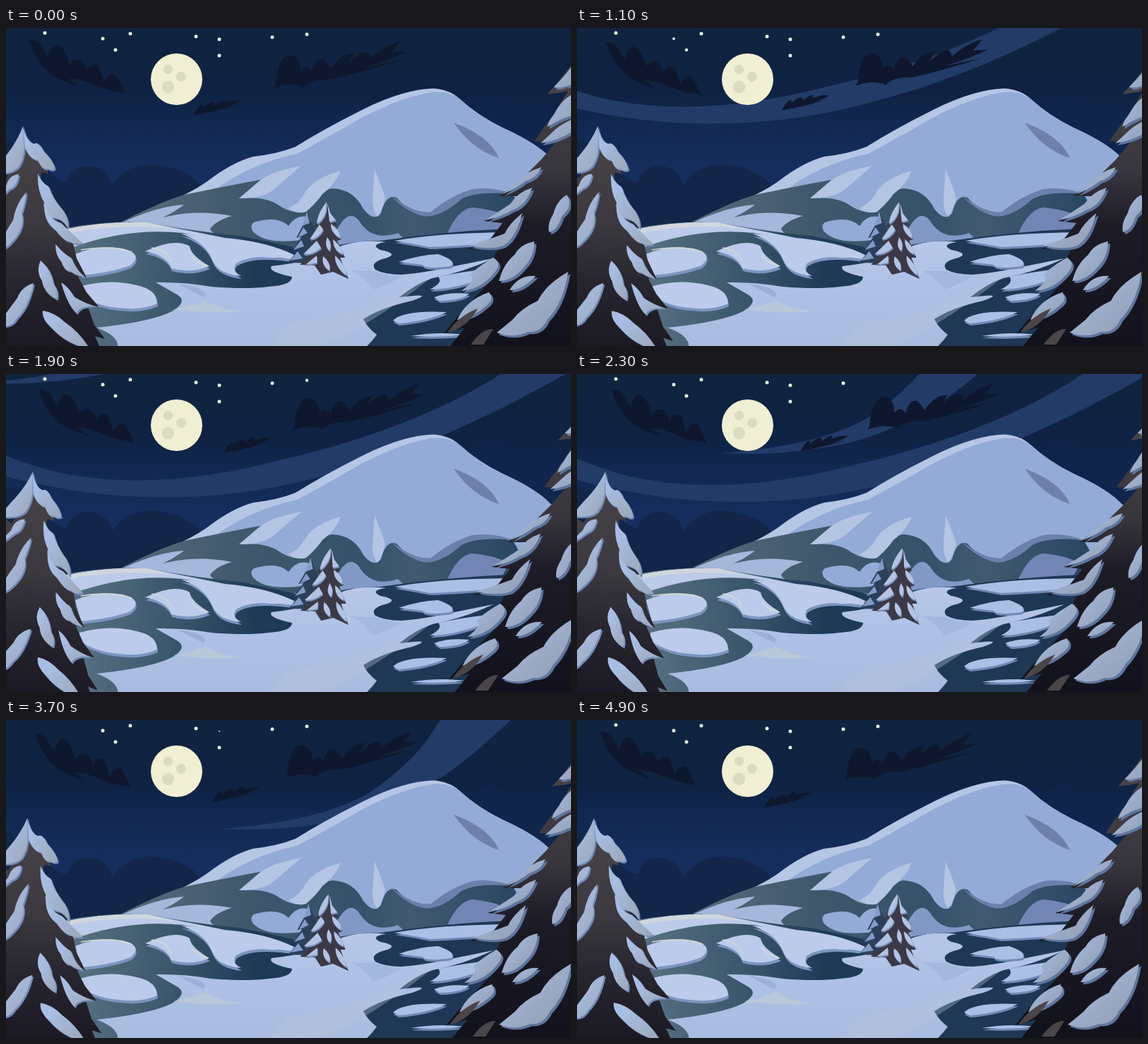
These frames come from a looping animation (800x450 px, 5000 ms). An HTML page:

```html
<!DOCTYPE html>
<html>
<head>
<meta charset="utf-8">
<style>
html, body { margin: 0; height: 100%; overflow: hidden; background: #10223f }
svg { display: block; width: 100%; height: 100% }
</style>
</head>
<body>
<svg id="stage" viewBox="0 0 800 450"></svg>
<script>
const stage = document.getElementById('stage');
const path = (d, fill, extra = '') => `<path d="${d}" fill="${fill}" ${extra}/>`;
const paths = (list, fill) => list.map(d => path(d, fill)).join('');
const disc = (x, y, r, fill) => `<circle cx="${x}" cy="${y}" r="${r}" fill="${fill}"/>`;
const grad = (id, attrs, ...stops) => `<linearGradient id="${id}" ${attrs}>` +
  stops.map(([o, c]) => `<stop offset="${o}" stop-color="${c}"/>`).join('') + '</linearGradient>';
// Snow with a shaded copy peeking out below
const snow = (list, fill, shade, dx, dy) =>
  `<g transform="translate(${dx} ${dy})">${paths(list, shade)}</g>` + paths(list, fill);

const down = 'gradientUnits="userSpaceOnUse" x1="0" y1="0" x2="0" y2="450"';
const across = 'gradientUnits="userSpaceOnUse" x1="0" y1="0" x2="800" y2="0"';
const slant = 'x1="0" y1="0" x2="1" y2="1"';
const defs = '<defs>' +
  grad('sky', down, [0, '#10233f'], [.2, '#0f2243'], [.3, '#112850'], [.42, '#152d5b'], [.62, '#17326a']) +
  grad('rock', across, [.2, '#5a6b7b'], [.42, '#40586d'], [.62, '#34526a'], [.72, '#415a71'], [.9, '#2a4763']) +
  grad('ground', across, [.1, '#5b7384'], [.3, '#3a566c'], [.44, '#1e3a57'], [1, '#1f3653']) +
  grad('field', down, [.62, '#bac9ea'], [.8, '#afc1e6'], [1, '#a9bbdf']) +
  grad('bark', down, [.3, '#4a464b'], [.62, '#3b383f'], [.8, '#27252e'], [1, '#1b1a24']) +
  grad('barkR', down, [.1, '#4a464b'], [.45, '#38353d'], [.62, '#1d1c26'], [1, '#12121c']) +
  grad('frost', slant, [.25, '#a8bde3'], [1, '#9ba7b8']) +
  grad('frostR', slant, [.2, '#a3b6da'], [1, '#909cae']) +
  '</defs>';

// x, y, then the moments (s) when the star vanishes
const stars = [[55, 7, 3.7], [137, 15, .8, 3.05], [155, 31, 1.45], [176, 8], [269, 12, 2.75],
  [302, 16, .55, 3.85], [302, 39, 1.5], [377, 13, 4.4], [426, 9, 2.25]];

const clouds = [
  { dx: 17.5, dy: 6, d: 'M33 17Q42 14 50 26Q54 33 60 42Q64 22 73 24Q83 28 90 52Q95 42 104 45Q112 50 114 60Q122 47 131 54L138 77Q146 62 154 66Q162 78 167 92Q140 88 116 77Q102 71 88 71Q96 78 104 83Q80 76 64 66Q40 46 33 17Z' },
  { dx: 35, dy: -7, d: 'M381 80Q384 40 402 39Q417 42 416 62Q424 50 432 62Q438 41 449 45Q456 52 459 58Q466 46 480 38L492 36Q486 44 484 50Q498 36 508 34Q515 36 514 44Q534 26 557 19Q552 28 544 35L566 34Q540 46 505 57L556 46Q500 64 460 73Q430 72 421 84Q405 76 378 85Z' },
  { dx: 56, dy: -16, d: 'M264 124Q272 107 278 110L277 114Q288 104 293 106L295 110Q304 100 309 103L308 107Q320 101 331 103Q320 110 306 113L325 109Q300 118 264 124Z' }
];

const gusts = [
  'M-200 -20Q-90 90 60 131Q200 163 380 116Q560 75 685 0L835 -100H950Q860 -48 775 0Q600 98 450 136Q230 198 0 140Q-130 100 -200 30Z',
  'M230 123Q370 113 440 72Q490 38 520 0L600 -120H740L606 0Q520 80 410 109Q320 128 230 123Z'
];

const mountain =
  path('M150 280Q250 242 285 217Q320 190 350 182Q385 178 410 168Q450 143 500 118Q560 87 605 85.5Q628 87 642 100Q668 124 703 141Q745 160 765 178L820 230V320H150Z', '#b5c5e4') +
  path('M300 226Q350 191 412 178Q455 155 500 129Q560 97 603 91Q626 88 642 100Q668 124 703 141Q745 160 765 178L820 230V320H340Z', '#93abd6') +
  path('M634 134Q684 152 698 184Q660 172 634 134Z', '#6f81aa') +
  path('M158 277Q230 240 262 234Q320 222 370 213Q356 224 330 241Q368 238 385 250Q405 264 425 260Q440 230 462 227Q492 228 506 256Q521 275 531 262Q538 234 553 240Q576 266 600 262Q625 247 640 236Q670 226 718 236L760 310H158Z', 'url(#rock)') +
  path('M545 237Q580 264 602 260Q628 238 660 228Q690 224 718 235Q668 230 645 242Q614 270 590 266Q566 260 545 237Z', '#6b80ab') +
  paths(['M418 195Q374 203 358 217L330 241Q366 241 381 227Z', 'M474 202Q437 212 424 232Q416 248 400 255Q412 264 425 260Q440 247 448 235Q466 222 474 202Z',
    'M522 200Q531 222 537 240Q533 258 526 267Q518 258 519 240Z'], '#b4c4e3') +
  path('M165 275Q215 252 252 250Q238 261 222 268Q270 256 320 266Q298 272 289 284Q290 291 316 300H160Z', '#a5b8dc') +
  path('M351 275Q385 265 400 280Q412 262 430 268Q440 285 420 300Q365 307 349 287Q345 279 351 275Z', '#93abd6') +
  path('M466 290Q486 250 502 276Q520 302 555 290L575 310H466Z', '#8299c6') +
  path('M624 292Q640 256 660 254Q690 256 712 268L700 292Z', '#7385b5');

const ground =
  path('M80 284Q140 272 200 275Q260 287 330 294Q400 308 440 318Q480 300 530 301Q620 288 710 284L800 270V450H60Z', 'url(#ground)') +
  path('M84 285Q140 273 200 275Q255 286 310 297Q370 302 410 322Q370 330 346 322Q310 302 250 290Q170 282 90 312Z', '#bccbe9') +
  path('M84 285Q140 273 200 275L240 285Q170 275 88 290Z', '#d0d6dc') +
  snow(['M98 320Q130 306 165 312Q196 320 176 336Q150 346 106 350Z',
    'M197 316Q240 296 260 309Q262 322 288 337Q262 348 234 340Q228 322 197 316Z',
    'M104 366Q145 354 185 364Q214 370 214 390Q192 400 160 396Q130 394 104 378Z',
    'M248 291Q310 296 330 312Q366 325 405 320L410 328Q350 318 326 333Q318 343 333 351Q300 348 292 328Q282 302 248 291Z'], '#bccbeb', '#7d94bf', 1, 4) +
  path('M106 314Q150 307 178 317M206 311Q228 314 234 330M262 322Q268 332 286 337', 'none', 'stroke="#d5d9d0" stroke-width="1.6"') +
  path('M212 360Q250 359 290 366Q340 370 372 366Q405 364 405 352Q370 345 376 337Q440 330 470 310Q500 298 538 303Q514 306 530 314Q556 319 540 325Q514 331 523 342Q536 349 560 349Q590 347 640 336L690 326Q650 345 604 354Q580 362 557 381Q610 374 575 386Q530 396 506 412Q512 424 525 434Q518 444 506 455H158Q162 436 128 424Q205 416 235 401Q260 386 240 376Z', 'url(#field)') +
  path('M243 362Q290 368 280 381Q262 372 243 362Z', '#9cafd6') +
  path('M238 398Q270 391 282 385Q300 398 338 401Q290 405 238 398Z', '#b9c7db') +
  path('M523 344Q540 352 560 351Q546 362 520 370Q505 350 488 343Z', '#a4b7dd') +
  path('M400 420Q500 402 560 372L600 355Q520 418 450 450H370Z', '#b8c4db', 'opacity=".35"') +
  snow(['M550 301Q610 290 710 289L738 268L700 304Q630 309 600 310Q580 306 550 301Z', 'M556 331Q585 321 612 320Q640 330 630 337Q592 342 590 335Z',
    'M606 381Q626 373 656 376Q646 385 614 386Z', 'M548 414Q562 399 624 402Q600 414 556 418Z', 'M573 436Q610 429 650 434Q620 438 573 436Z',
    'M612 352Q650 344 690 340L668 357Q630 370 600 370Q620 360 612 352Z'], '#abbfe5', '#7389b5', 1, 3);

const midTrees =
  path('M426 260L440 290 436 333 399 332 412 316 406 314 418 296 411 297 422 276Z', '#2c405c') +
  paths(['M426 260L420 280 430 276Z', 'M421 282L413 297 427 290Z', 'M418 300L407 314 422 309Z', 'M413 316L402 329 420 326Z'], '#849bc7') +
  path('M454 245L459 264 469 279 463 280 475 299 469 301 480 325 473 325 485 355 463 345 446 349 437 336 416 335 432 319 422 320 437 300 428 302 442 281 435 283 447 263Z', '#3c3947') +
  snow(['M454 246Q441 262 440 277Q449 272 453 259Z', 'M455 248L459 262 467 272 458 274Z', 'M444 278L430 299Q442 298 449 285Z', 'M460 277Q459 289 473 297Q473 286 460 277Z',
    'M440 301L421 320Q434 321 446 311Z', 'M455 296Q450 309 458 315Q462 305 455 296Z', 'M463 299Q463 315 477 320Q474 307 463 299Z', 'M440 322L424 335 440 332Z',
    'M449 323Q446 336 458 343Q460 331 449 323Z', 'M466 322Q465 338 482 350Q480 334 466 322Z'], '#b3c3e4', '#7e94c0', 1, 2);

const leftTree =
  path('M24 138L30 164 54 185 60 206 50 204 49 214 64 238 89 283 73 270 80 284 108 305 95 304 100 326 114 353 102 352 114 374 131 394 115 392 125 420 140 440 126 436 150 490H-60V180L0 214 18 172Z', 'url(#bark)') +
  snow(['M24 139Q16 160 2 178Q-20 205 -12 206Q10 206 18 196Q28 180 25 160Z',
    'M24 139Q28 160 40 164Q46 160 53 174Q66 186 69 199Q65 203 58 199Q51 202 45 187Q34 186 27 170Z',
    'M18 207Q4 208 0 224L-22 250Q-2 235 5 228Q16 224 18 207Z', 'M29 232Q14 248 10 272Q-2 290 -14 316Q0 313 8 303Q28 282 22 262Q27 248 29 232Z',
    'M45 206Q49 218 60 224Q66 242 80 257Q90 272 87 283Q80 268 63 268Q51 255 54 247Q44 230 45 206Z',
    'M54 254Q64 272 78 276Q92 290 108 304Q99 308 90 302Q82 302 70 286Q55 276 54 254Z',
    'M70 306Q82 320 92 325Q99 343 112 352Q99 350 91 344Q83 345 78 330Q70 322 70 306Z',
    'M49 329Q42 344 51 358Q54 376 72 384Q75 372 67 362Q64 342 49 329Z', 'M39 361Q22 366 16 382L-12 420Q6 427 16 410Q32 394 39 361Z',
    'M52 400Q50 412 65 425Q84 446 118 454Q104 430 83 416Q68 402 52 400Z', 'M78 360Q88 366 96 380Q112 390 128 394Q104 392 100 404Q87 392 78 360Z'], 'url(#frost)', '#7089b8', 2, 2);

const rightTree =
  path('M810 40L782 76 766 94 796 89 774 124 748 160 778 162 758 186 730 214 698 238 727 238 706 260 677 273 703 276 686 298 653 313 696 313 684 340 664 357 688 356 650 396 620 432 650 424 625 455H880V40Z', 'url(#barkR)') +
  snow(['M810 43Q790 70 776 83Q778 88 812 77Z', 'M810 90Q788 98 776 122Q766 135 767 140Q790 124 810 123Z', 'M810 126Q785 135 772 149L757 163Q784 160 810 141Z',
    'M758 197Q735 204 724 217L703 235Q723 227 735 217Q752 212 758 197Z', 'M745 226Q725 232 714 249L679 272Q702 267 716 258Q736 252 745 226Z',
    'M731 262Q713 276 706 291Q690 297 656 308Q684 314 702 309Q721 301 731 262Z', 'M794 236Q780 244 775 263Q766 277 769 289Q781 286 787 266Q804 252 794 236Z',
    'M748 302Q728 306 720 321Q704 334 698 358Q717 358 733 339Q748 324 748 302Z', 'M690 325Q663 341 657 350Q668 354 645 372Q672 370 690 348Q704 333 690 325Z',
    'M684 374Q651 385 639 413Q663 409 680 393Q692 384 684 374Z', 'M750 351Q726 349 713 371Q730 372 750 351Z',
    'M796 345Q764 363 753 386Q729 397 717 413L695 431Q718 440 739 430Q758 432 767 412Q789 389 796 345Z'], 'url(#frostR)', '#5f769f', 3, 3) +
  paths(['M668 397Q641 407 625 431Q652 425 668 397Z', 'M690 426Q674 425 658 448H676Z', 'M796 84L772 92Q784 93 796 88Z'], '#4a4548');

stage.innerHTML = defs +
  '<rect width="800" height="450" fill="url(#sky)"/>' +
  gusts.map((d, i) => path(d, '#233b67', `id="gust${i}"`)).join('') +
  path('M0 158Q34 168 55 195Q68 216 86 218Q92 194 120 195Q145 199 150 222Q170 194 205 193Q246 195 272 218L300 300H0Z', '#132649') +
  path('M630 150Q650 92 688 93Q716 96 730 122Q745 101 800 108V240H630Z', '#10244a', 'opacity=".75"') +
  stars.map(([x, y], i) => `<circle id="star${i}" cx="${x}" cy="${y}" fill="#eef1ee"/>`).join('') +
  disc(241.5, 72.5, 36.5, '#f0efd3') + disc(229.5, 58.5, 6.8, '#dcdbc2') + disc(248, 69, 7, '#dcdbc2') + disc(229.5, 83.5, 8.7, '#dcdbc2') +
  clouds.map((c, i) => path(c.d, '#0e172e', `id="cloud${i}"`)).join('') +
  mountain + ground +
  `<g id="mid">${midTrees}</g><g id="left">${leftTree}</g><g id="right">${rightTree}</g>`;

const move = (id, value) => document.getElementById(id).setAttribute('transform', value);
const clamp = v => Math.max(0, Math.min(1, v));
const key = (t, ...keys) => {
  const i = Math.max(1, keys.findIndex(k => k[0] >= t));
  const [a, u] = keys[i - 1], [b, v] = keys[i];
  return u + (v - u) * (t - a) / (b - a);
};

function draw(now) {
  const t = Math.floor(now % 5000 / 100) / 10;
  const drift = 1 - Math.abs((t + .06) % 5 / 2.5 - 1);
  const sway = (1 - Math.cos(Math.PI * clamp((drift - .12) / .88))) / 2;
  clouds.forEach((c, i) => move('cloud' + i, `translate(${drift * c.dx} ${drift * c.dy})`));
  stars.forEach(([x, y, ...out], i) => {
    const size = Math.min(1, ...out.map(m => Math.abs(t - m) / .4));
    document.getElementById('star' + i).setAttribute('r', 2.5 * size);
  });
  const g0 = key(t, [0, -260], [.7, -65], [1.5, 0], [2.3, 13], [3.1, 60], [3.7, 200], [5, 300]);
  const g1 = key(t, [0, -160], [1.7, -160], [2.3, -11], [3.1, 0], [3.7, 31], [4.2, 110], [5, 200]);
  move('gust0', `translate(${g0 * .87} ${g0})`);
  move('gust1', `translate(${g1 * 2.4} ${g1})`);
  move('left', `rotate(${5.3 * sway} 40 315)`);
  move('mid', `translate(0 350) skewX(${-4 * sway}) translate(0 -350)`);
  move('right', `translate(0 700) skewX(${-1.7 * sway}) translate(0 -700)`);
}

const start = performance.now();
function tick() {
  draw(performance.now() - start);
  requestAnimationFrame(tick);
}
tick();
</script>
</body>
</html>
```
